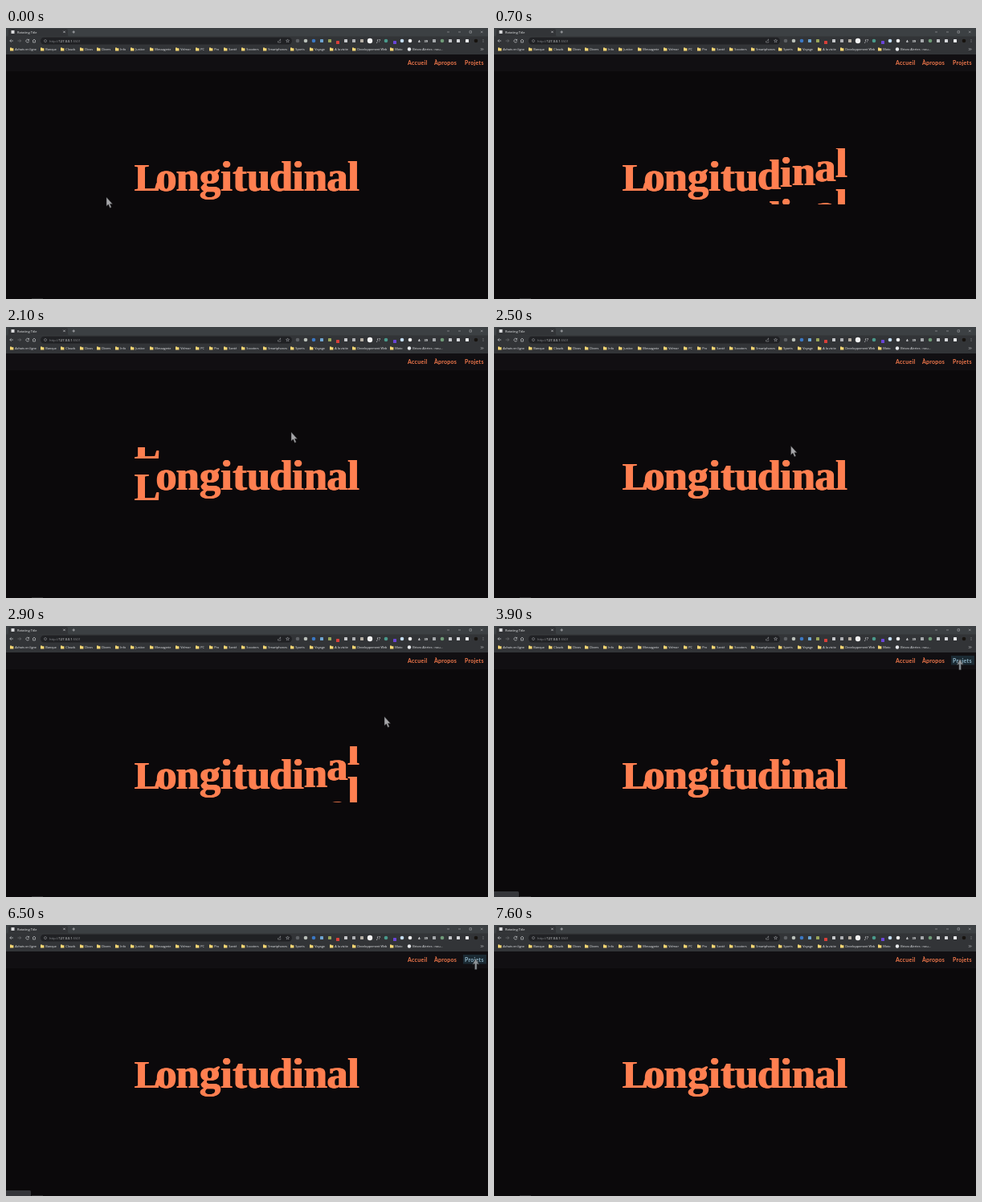
An HTML page that plays this animation: 600 px wide and 338 px high, repeating every 7800 ms.

```html
<!DOCTYPE html>
<html lang="fr">
<head>
<meta charset="utf-8">
<title>Rotating Title</title>
<style>
  html, body { margin: 0; width: 100%; height: 100%; overflow: hidden; background: #0b090b; }
  #stage { position: relative; width: 600px; height: 338px; overflow: hidden; background: #0b090b; }
  #stage > * { position: absolute; }
  svg { left: 0; top: 0; overflow: visible; }
  .ui { font: 4px "Open Sans", "Noto Sans", sans-serif; fill: #eceef0; }
  nav { left: 0; top: 33px; width: 600px; height: 21px; background: #110f12; }
  .link, .shine { position: absolute; font: 700 7px/12px Lato, sans-serif; letter-spacing: .25px; white-space: nowrap; }
  .link { top: 3.5px; height: 12px; color: #f4794c; }
  .shine { left: 0; top: 0; height: 12px; width: 100%; background: #1b2a33; color: #8fb4c8; }
  .link span { position: absolute; left: 2px; }
  h1 { left: 0; top: 150px; margin: 0; width: 600px; height: 70px; }
  .cell { position: absolute; top: 0; height: 70px; clip-path: inset(0 -3px); }
  .cell span { position: absolute; left: 50%; top: .5px; color: #ff7f50; white-space: nowrap;
    font: 700 52px/70px "Liberation Serif", "Times New Roman", serif;
    text-shadow: .8px 0 #ff7f50, -.8px 0 #ff7f50; }
  .cell:first-child span { left: -.5px; top: 1.8px; font-size: 48px; }
  #status { left: 0; top: 331px; width: 31px; height: 7px; background: #35363a; border-radius: 0 1.5px 0 0; }
</style>
</head>
<body>
<div id="stage">
  <svg id="chrome" class="ui" width="600" height="33" viewBox="0 0 600 33">
    <rect width="600" height="33" fill="#323437"/>
    <rect width="600" height="10.5" fill="#3c4043"/>
    <path d="M1 10.5Q3 10.5 3 8.5V3Q3 1 5 1H75Q77 1 77 3V8.5Q77 10.5 79 10.5Z" fill="#323437"/>
    <rect x="6.5" y="3" width="4" height="4" fill="#d9dadc"/>
    <text x="14" y="6.5">Rotating Title</text>
    <g fill="none" stroke="#d9dbde" stroke-width=".6">
      <path d="M71.3 3.7l2.4 2.4m0-2.4l-2.4 2.4M82.5 5h3.4m-1.7-1.7v3.4"/>
      <path d="M9 16H4.8m1.8-1.8L4.8 16l1.8 1.8"/>
      <path d="M14.5 16h4.2m-1.8-1.8l1.8 1.8-1.8 1.8" stroke="#77797d"/>
      <path d="M28.2 14.9A1.9 1.9 0 1 0 28.6 16.6M28.6 13.8v1.5h-1.5"/>
      <path d="M33 16l2-2 2 2m-3.4-.4V18h2.8v-2.4"/>
      <path d="M591 25.2l1.3 1.3-1.3 1.3m1.8-2.6l1.3 1.3-1.3 1.3"/>
      <path d="M549 5h3M563 5h3M577 3.7h2.5v2.5H577zM591 3.7l2.5 2.5m0-2.5L591 6.2" stroke="#a4a6a9"/>
    </g>
    <rect x="43" y="11.8" width="313" height="8.6" rx="4.3" fill="#202124"/>
    <circle cx="49" cy="16.1" r="1.5" fill="none" stroke="#a9abae" stroke-width=".5"/>
    <text x="54" y="17.6" fill="#8b8d91">http://<tspan fill="#eceef0">127.0.0.1</tspan>:5501</text>
    <path d="M338.6 16.2V18h3.2v-1.3M339.8 16.5q.3-1.8 2.2-1.8m-1-1l1.1 1-1.1 1M350.6 13.9l.6 1.4 1.5.1-1.2 1 .4 1.5-1.3-.8-1.3.8.4-1.5-1.2-1 1.5-.1z" fill="none" stroke="#a9abae" stroke-width=".5"/>
    <g id="icons"></g>
    <text x="461" y="17.7" font-style="italic" font-size="5">ƒ?</text>
    <text x="513" y="17.6" font-weight="700">4:</text>
    <text x="520.5" y="17.6" font-weight="700">39</text>
    <g id="marks" font-size="3.8"></g>
    <circle cx="502" cy="26.5" r="2.2" fill="#e8eaed"/>
    <text x="506.3" y="27.9" font-size="3.8">Brivex Alertes : nou...</text>
  </svg>
  <nav></nav>
  <h1 aria-label="Longitudinal"></h1>
  <svg width="600" height="338"><path d="M32 337.6h14" stroke="#3a3a3c" stroke-width=".8"/></svg>
  <div id="status"><svg class="ui" width="31" height="7"><text x="1" y="5" font-size="3.6" fill="#b4b6b9">127.0.0.1:5501/#</text></svg></div>
  <svg width="600" height="338">
    <g id="cursor" stroke="#2a2a2c" stroke-width=".5">
      <path id="arrow" d="M0 0V11.2L2.5 9 4.4 13.4 6.2 12.6 4.4 8.4H7.6Z" fill="#a6a6a9"/>
      <path id="pointer" d="M0 0L-4 7.2-1.2 6.4V13.4H1.4V6.4L4.2 7.2Z" fill="#8d9499"/>
    </g>
  </svg>
</div>
<script>
const LOOP = 7800, STEP = 100, ROLL = 400, SWIPE = 300, PITCH = 52;
const $ = id => document.getElementById(id);
const add = (parent, tag, cls, text) => {
  const el = document.createElement(tag);
  if (cls) el.className = cls;
  if (text) el.textContent = text;
  return parent.appendChild(el);
};

// browser bars
const folders = [[5, "Achats en ligne"], [43, "Banque"], [68, "Clouds"], [92, "Divos"], [113, "Divers"],
  [136, "Info"], [155, "Justice"], [179, "Messagerie"], [211, "Velmor"], [236, "PC"], [253, "Pro"],
  [271, "Santé"], [293, "Scooters"], [320, "Smartphones"], [354, "Sports"], [378, "Voyage"],
  [403, "A la visite"], [431, "Developpement Web"], [478, "Moto"]];
$("marks").innerHTML = folders.map(([x, name]) =>
  `<path d="M${x} 24.5h1.8l.6.7h2v3.4h-4.4z" fill="#f7d774"/><text x="${x + 6.3}" y="27.9">${name}</text>`).join("");

const dots = [[363, "#5d6064"], [373, "#b9bfb9"], [383, "#3b78c4"], [453, "#f1f1f1", 3.2], [473, "#4a9a8c"],
  [493, "#c3dcf0"], [503, "#f1f1f1"], [543, "#6f9a78"], [585, "#17130f"]];
const tiles = [[393, "#6ea4d0"], [403, "#9aa65a"], [413, "#d8403a", 16], [423, "#c5c7ca"], [433, "#aeb0b3"],
  [443, "#b5afa5"], [484, "#6a45d8", 16], [533, "#a5a8ab"], [553, "#c2c4c7"],
  [563, "#d5d7da"], [574, "#eceef0"]];
$("icons").innerHTML =
  dots.map(([x, c, r = 2.3]) => `<circle cx="${x}" cy="16" r="${r}" fill="${c}"/>`).join("") +
  tiles.map(([x, c, y = 14]) => `<rect x="${x - 2}" y="${y}" width="4" height="4" rx=".6" fill="${c}"/>`).join("") +
  [14.4, 16, 17.6].map(y => `<circle cx="594" cy="${y}" r=".45" fill="#c9cbce"/>`).join("");

// title letters and menu links
const edges = [160.5, 187.5, 211.5, 241, 267, 282, 300, 329, 356, 371, 400, 425, 440];
const letters = [..."Longitudinal"].map((ch, i) => {
  const cell = add(document.querySelector("h1"), "div", "cell");
  cell.style.left = edges[i] + "px";
  cell.style.width = edges[i + 1] - edges[i] + "px";
  return { copies: [add(cell, "span", "", ch), add(cell, "span", "", ch)],
    shift: i ? "-50%" : "0", starts: [] };
});
const links = [["Accueil", 498, 527], ["Àpropos", 531, 565], ["Projets", 569, 598]].map(([name, x0, x1]) => {
  const box = add(document.querySelector("nav"), "div", "link");
  box.style.left = x0 + "px";
  box.style.width = x1 - x0 + "px";
  add(box, "span", "", name);
  const shine = add(box, "div", "shine");
  add(shine, "span", "", name);
  return { x0, x1, shine, visits: [] };
});

// mouse path: time, x, y
const path = [[0, 125, 211], [120, 125, 211], [480, 452, 208], [590, 452, 206], [848, 371, 207],
  [960, 356, 207], [1020, 329, 206], [1065, 300, 206], [1150, 282, 206], [1320, 165, 204],
  [1450, 90, 200], [1700, 35, 168], [1965, 160, 157], [2000, 186, 149], [2100, 355, 131],
  [2300, 362, 140], [2565, 372, 151], [2620, 400, 160], [2720, 425, 157], [2780, 441, 149],
  [2900, 471, 113], [3300, 560, 66], [3550, 580, 42], [4050, 580, 41], [4100, 562, 41],
  [4420, 530, 42], [4450, 524, 42], [4600, 510, 42], [4690, 514, 42], [4750, 531, 41],
  [4900, 544, 41], [5600, 546, 41], [5750, 564, 42], [5850, 583, 42], [6600, 585, 42],
  [6850, 606, 50], [LOOP, 606, 50]];
const mouse = t => {
  const i = path.findIndex(p => p[0] > t);
  const [a, b] = [path[i - 1], path[i]];
  const k = (t - a[0]) / (b[0] - a[0]);
  return [a[1] + (b[1] - a[1]) * k, a[2] + (b[2] - a[2]) * k];
};
const letterAt = (x, y) => y < 150 || y > 220 ? -1 : letters.findIndex((_, i) => x >= edges[i] && x < edges[i + 1]);
const linkAt = (x, y) => y < 36 || y > 50 ? -1 : links.findIndex(l => x >= l.x0 && x <= l.x1);

// collect hover times once; a letter already rolling ignores the mouse
let lastLetter = -1, lastLink = -1;
for (let t = 0; t < LOOP; t += 5) {
  const [x, y] = mouse(t), a = letterAt(x, y), b = linkAt(x, y);
  if (a >= 0 && a !== lastLetter) {
    const s = letters[a].starts;
    if (!s.length || t - s[s.length - 1] >= ROLL) s.push(t);
  }
  if (b !== lastLink) {
    if (lastLink >= 0) links[lastLink].visits.at(-1).leave = t;
    if (b >= 0) links[b].visits.push({ enter: t, leave: LOOP });
  }
  lastLetter = a;
  lastLink = b;
}

const ease = p => (p = Math.min(1, Math.max(0, p)), p * p * (3 - 2 * p));

function draw(t) {
  for (const { copies, shift, starts } of letters) {
    const start = starts.findLast(s => s <= t);
    const p = start === undefined ? 0 : ease((t - start) / ROLL);
    const dy = p < 1 ? p * PITCH : 0;
    copies[0].style.transform = `translate(${shift}, ${dy}px)`;
    copies[1].style.transform = `translate(${shift}, ${dy - PITCH}px)`;
    copies[1].style.visibility = dy ? "visible" : "hidden";
  }
  for (const { shine, visits } of links) {
    const v = visits.findLast(v => v.enter <= t);
    const left = v ? ease((t - v.leave) / SWIPE) : 0;
    const right = v ? ease((t - v.enter) / SWIPE) : 0;
    shine.style.visibility = right > left ? "visible" : "hidden";
    shine.style.clipPath = `inset(0 ${100 - right * 100}% 0 ${left * 100}%)`;
  }
  const [x, y] = mouse(t), onLink = linkAt(x, y) >= 0;
  $("cursor").setAttribute("transform", `translate(${x} ${y})`);
  $("cursor").style.display = letterAt(x, y) >= 0 ? "none" : "";
  $("arrow").style.display = onLink ? "none" : "";
  $("pointer").style.display = onLink ? "" : "none";
  $("status").style.display = t >= 3600 && t < 7000 ? "" : "none";
}

const begin = performance.now();
function tick() {
  const t = (performance.now() - begin) % LOOP;
  draw(Math.floor(t / STEP) * STEP);
  requestAnimationFrame(tick);
}
tick();
</script>
</body>
</html>
```
